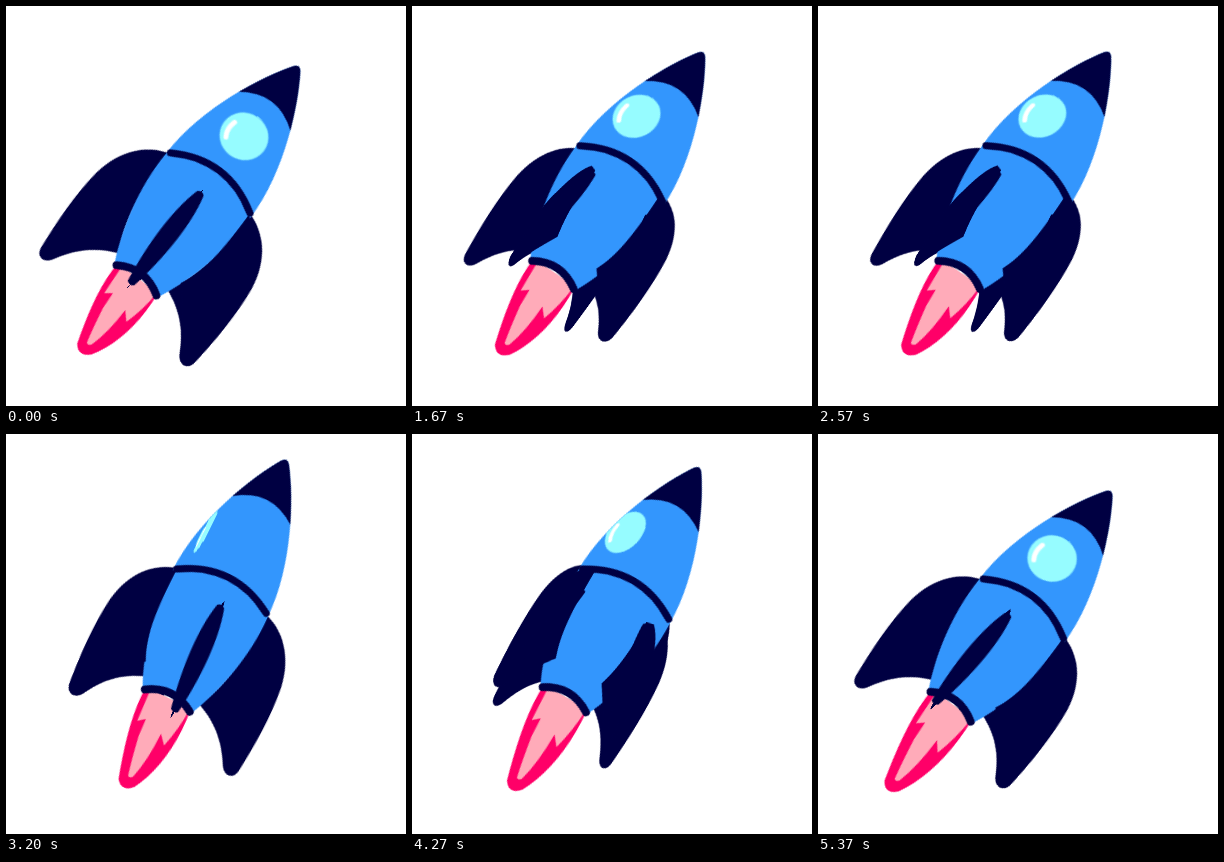
These frames come from a looping animation (400 by 400 pixels, 5410 ms). An HTML page without scripts:

```html
<!DOCTYPE html>
<html lang="en">
<head>
<meta charset="utf-8">
<title>Rocket</title>
<style>
  :root {
    --t: 901.667ms; /* half a roll, one full bob */
    --sine: cubic-bezier(.3642, 0, .6358, 1);
    --navy: #000042;
    --blue: #3396fd;
  }
  html, body {
    margin: 0;
    width: 100%;
    height: 100%;
    overflow: hidden;
    background: #fff;
  }
  .stage {
    position: relative;
    width: 100%;
    height: 100%;
    overflow: clip;
    contain: strict;
  }
  .bob, .tilt {
    position: absolute;
    left: 0;
    top: 0;
  }
  /* The rocket stands upright with its tip at 0,0 and turns about 0,140. */
  .bob {
    animation: bob calc(var(--t) / 2) var(--sine) -807ms infinite alternate;
  }
  .tilt {
    transform-origin: 0 140px;
    animation: tilt calc(var(--t) / 2) var(--sine) -869ms infinite alternate;
  }
  svg, .port {
    position: absolute;
    left: -120px;
    top: -20px;
    width: 240px;
    height: 420px;
    overflow: visible;
  }
  .port {
    clip-path: path("M116,21 Q120,16 124,21 C142,47 173,110 173,168 L67,168 C67,110 98,47 116,21Z");
  }
  .port svg { left: 0; top: 0; }

  /* Parts that ride around the long axis; the near side is seen from below. */
  .roll {
    transform-origin: 120px 20px;
    animation: roll var(--t) linear infinite;
    animation-delay: calc(var(--t) * (-.489 - .5 * var(--k, 0)));
  }
  .k1 { --k: 1; }
  .fin { --put: rotateY(-90deg) scaleY(1.048); fill: var(--navy); }
  .back {
    --lean: 0deg;
    --put: rotateY(-90deg) scaleY(1);
    animation-direction: reverse;
  }
  .edge { --put: translate3d(0, 180px, 50px) rotateX(16deg); fill: var(--navy); }
  .window { --put: translate3d(0, 104.5px, 41px); }

  /* The root of a near fin climbs to the band as it reaches the outline. */
  .near {
    animation: root var(--t) linear infinite;
    animation-delay: calc(var(--t) * (-.489 - .5 * var(--k, 0)));
  }
  .flame {
    transform-origin: 0 268px;
    animation: flicker var(--t) linear infinite;
  }

  @keyframes bob {
    from { transform: translate(206px, 35.5px); }
    to { transform: translate(218px, 12px); }
  }
  @keyframes tilt {
    from { transform: rotate(37.3deg); }
    to { transform: rotate(26.3deg); }
  }
  @keyframes roll {
    from { transform: rotateX(var(--lean, 17.5deg)) rotateY(-90deg) var(--put); }
    to { transform: rotateX(var(--lean, 17.5deg)) rotateY(90deg) var(--put); }
  }
  @keyframes root {
    0%, 25%, 84%, 100% {
      d: path("M50,148 L60,153 Q82,172 92,208 C101,236 99,268 96,298 C95,308 86,310 80,302 C68,280 54,264 37,243 C46,226 51,205 50,148Z");
    }
    32%, 77% {
      d: path("M49,170 L61,171 Q79,186 91,220 C101,240 99,268 96,298 C95,308 86,310 80,302 C68,280 54,264 37,243 C46,226 51,205 49,170Z");
    }
  }
  @keyframes flicker {
    0%, 100% { transform: scaleY(.87); }
    15%, 41% { transform: scaleY(1); }
    60% { transform: scaleY(.9); }
    74% { transform: scaleY(1); }
    85% { transform: scaleY(.91); }
    96% { transform: scaleY(1); }
  }
</style>
</head>
<body>
<div class="stage"><div class="bob"><div class="tilt">

  <!-- fins behind the hull -->
  <svg class="roll fin back" viewBox="-120 -20 240 420">
    <defs>
      <path id="fin" d="M50,146 C72,152 92,172 97,205 C101,236 99,268 96,298 C95,308 86,310 80,302 C68,280 54,266 30,256 C42,238 53,200 50,146Z"/>
      <path id="edge" d="M-4,3 Q0,-2 4,3 C12,38 11,90 4,139 Q0,143 -4,139 C-11,90 -12,38 -4,3Z"/>
    </defs>
    <use href="#fin"/>
  </svg>
  <svg class="roll fin back k1" viewBox="-120 -20 240 420"><use href="#fin"/></svg>
  <svg class="roll fin" viewBox="-120 -20 240 420"><use href="#fin"/></svg>
  <svg class="roll fin k1" viewBox="-120 -20 240 420"><use href="#fin"/></svg>

  <!-- flame and hull -->
  <svg viewBox="-120 -20 240 420">
    <defs>
      <clipPath id="hull">
        <path id="body" d="M-4,1 Q0,-4 4,1 C22,27 53,90 53,148 C55,190 43,235 28,266 Q0,250 -28,266 C-43,235 -55,190 -53,148 C-53,90 -22,27 -4,1Z"/>
      </clipPath>
    </defs>
    <g class="flame">
      <path fill="#ff0068" d="M-25,266 C-27,295 -18,334 -9,366 Q-1,378 9,366 C22,342 29,306 25,266Z"/>
      <path fill="#ffabb9" d="M-20,264 L-18,301 L-11,295 L-10,315 Q-6,340 -2,358 Q0,361 3,357 Q9,335 9,302 L17,312 Q23,290 24,264Z"/>
    </g>
    <use href="#body" fill="var(--blue)"/>
    <path clip-path="url(#hull)" fill="var(--navy)" d="M-34,56 Q0,30 34,56 V-20 H-34Z"/>
  </svg>

  <div class="port">
    <svg class="roll window" viewBox="-120 -20 240 420">
      <circle r="24.7" fill="#96fcff"/>
      <path d="M-16,-6 Q-19,4 -14,12" fill="none" stroke="#fff" stroke-width="5" stroke-linecap="round"/>
    </svg>
  </div>

  <!-- fins in front of the hull -->
  <svg class="roll fin" viewBox="-120 -20 240 420"><path class="near"/></svg>
  <svg class="roll edge" viewBox="-120 -20 240 420"><use href="#edge"/></svg>
  <svg class="roll fin k1" viewBox="-120 -20 240 420"><path class="near"/></svg>
  <svg class="roll edge k1" viewBox="-120 -20 240 420"><use href="#edge"/></svg>

  <!-- band and collar -->
  <svg viewBox="-120 -20 240 420" fill="none" stroke="var(--navy)" stroke-linecap="round">
    <path stroke-width="7" d="M-50,145 Q0,114 50,145"/>
    <path stroke-width="8" d="M-25,267 Q0,251 25,267"/>
  </svg>

</div></div></div>
</body>
</html>
```
